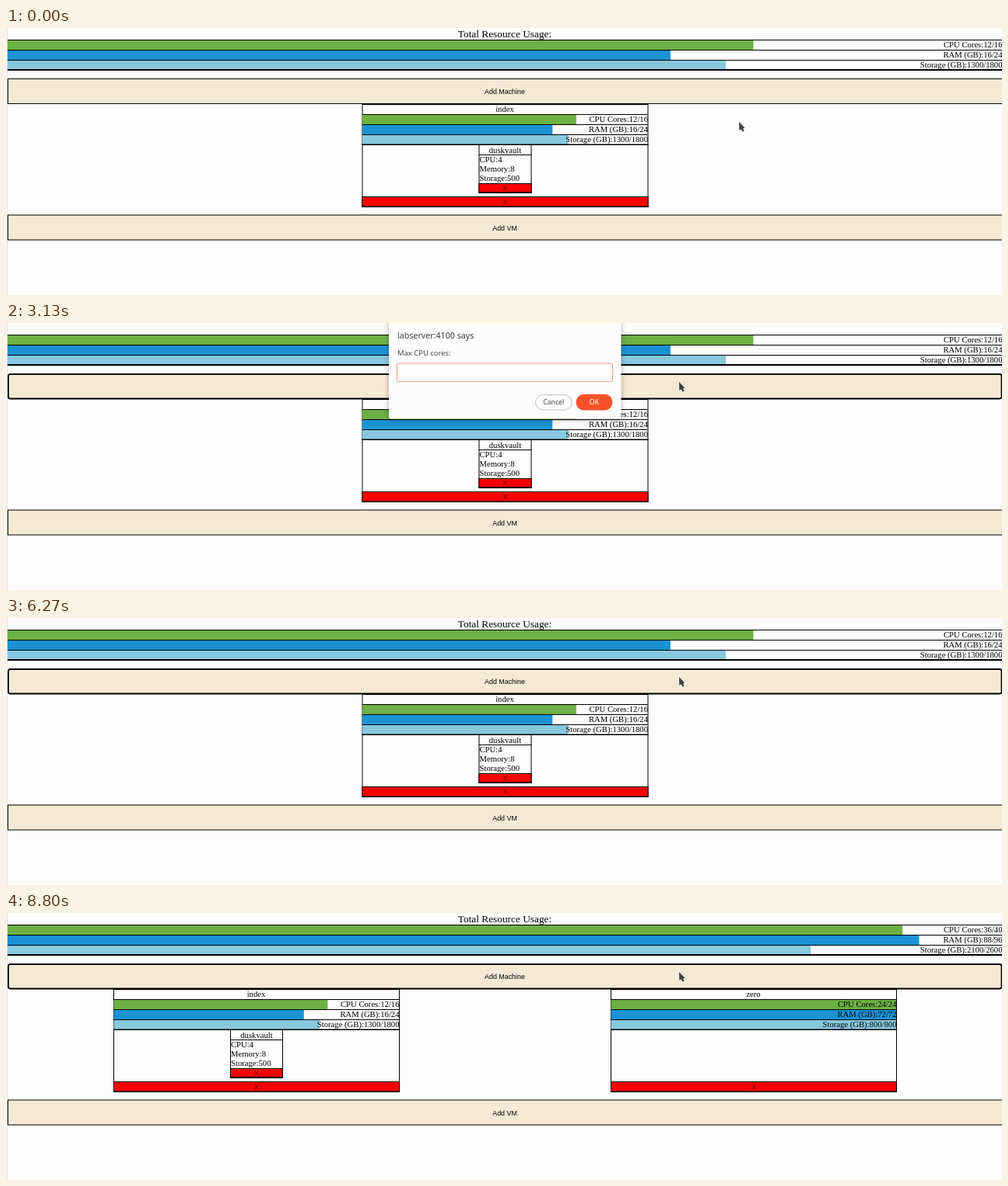
An HTML page with a canvas for the animation above (9470 ms loop, 1280 by 344 pixels).

```html
<!DOCTYPE html>
<html lang="en">
<head>
<meta charset="utf-8">
<title>Resource dashboard</title>
<style>
html, body { margin: 0; width: 100%; height: 100%; overflow: hidden; background: #fdfdfd; }
canvas { display: block; }
</style>
</head>
<body>
<canvas id="stage" width="1280" height="344"></canvas>
<script>
const ctx = document.getElementById('stage').getContext('2d');
const LOOP = 9470;
const PAGE = '#fdfdfd', INK = '#000', RED = '#fb0000', BEIGE = '#f5e9d6';
const SERIF = '"Liberation Serif", serif';
const SANS = '"Liberation Sans", sans-serif';
const UI = '"Noto Sans", sans-serif';
const BAR_COLORS = ['#6db044', '#1a92d3', '#87c8df'];
const BAR_NAMES = ['CPU Cores', 'RAM (GB)', 'Storage (GB)'];

// Each dialog: open and close times, prompt, answer, time of each key
const dialogs = [
  { open: 990, close: 2350, label: 'Name of machine:', answer: 'zero', keys: [1600, 1730, 1860, 2000] },
  { open: 2600, close: 4470, label: 'Max CPU cores:', answer: '24', keys: [3670, 3730] },
  { open: 4660, close: 6130, label: 'Max RAM in GB:', answer: '72', keys: [5530, 5670] },
  { open: 6480, close: 8200, label: 'Max storage in GB:', answer: '800', keys: [7670, 7800, 7870] }
];
const FOCUS_AT = 930, ADDED_AT = 8330;

const clamp = v => Math.max(0, Math.min(1, v));
const smooth = v => v * v * (3 - 2 * v);
const mix = (a, b, k) => a + (b - a) * k;

function rect(x, y, w, h, color) {
  ctx.fillStyle = color;
  ctx.fillRect(x, y, w, h);
}

function text(str, x, y, size, family, align = 'left', color = INK) {
  ctx.font = size + 'px ' + family;
  ctx.textAlign = align;
  ctx.fillStyle = color;
  ctx.fillText(str, x, y);
}

function outline(x, y, w, h) {
  ctx.strokeStyle = INK;
  ctx.lineWidth = 1;
  ctx.strokeRect(x + 0.5, y + 0.5, w - 1, h - 1);
}

function round(x, y, w, h, r, fill, stroke, width = 1) {
  ctx.beginPath();
  ctx.roundRect(x, y, w, h, r);
  if (fill) { ctx.fillStyle = fill; ctx.fill(); }
  if (stroke) { ctx.strokeStyle = stroke; ctx.lineWidth = width; ctx.stroke(); }
}

function bars(x, y, w, step, usage) {
  usage.forEach(([free, max], i) => {
    const top = Math.round(y + i * step);
    rect(x, top + 1, w * free / max, step - 1, BAR_COLORS[i]);
    rect(x, top, w, 1, INK);
    text(`${BAR_NAMES[i]}:${free}/${max}`, x + w + 0.5, top + 10.3, 10.67, SERIF, 'right');
  });
}

function wideButton(label, y, focused) {
  if (focused) {
    round(3, y + 1, 1276.5, 31.5, 2.5, BEIGE, INK, 1.8);
  } else {
    rect(2, y, 1278, 33, BEIGE);
    outline(2, y, 1280, 33);
  }
  text(label, 641, y + 20, 8.89, SANS, 'center');
}

function deleteBar(x, y, w, h) {
  rect(x, y, w, h, RED);
  outline(x, y, w, h);
  rect(x, y + h - 1.5, w, 1.5, INK);
  text('X', x + w / 2, y + h / 2 + 3, 8.89, SANS, 'center', '#500');
}

function vm(x) {
  outline(x, 150, 68, 63);
  text('duskvault', x + 34, 160.5, 10.67, SERIF, 'center');
  rect(x, 163, 68, 1, INK);
  ['CPU:4', 'Memory:8', 'Storage:500'].forEach((line, i) =>
    text(line, x + 1, 173.3 + i * 12, 10.67, SERIF));
  deleteBar(x, 200, 68, 12.5);
}

function machine(x, name, usage, hasVm) {
  outline(x, 98, 368, 133);
  text(name, x + 183.5, 108, 10.67, SERIF, 'center');
  bars(x + 0.5, 111, 366.5, 13, usage);
  rect(x, 149.5, 368, 1.5, INK);
  if (hasVm) vm(x + 150);
  deleteBar(x, 217, 368, 14);
}

function page(focused, added) {
  rect(0, 0, 1280, 344, PAGE);
  rect(1, 0, 1, 344, '#dedede');
  text('Total Resource Usage:', 641, 12, 13.33, SERIF, 'center');
  bars(2, 15, 1278, 13, added
    ? [[36, 40], [88, 96], [2100, 2600]]
    : [[12, 16], [16, 24], [1300, 1800]]);
  rect(2, 53, 1278, 2, INK);
  wideButton('Add Machine', 65, focused);
  machine(added ? 138 : 457.5, 'index', [[12, 16], [16, 24], [1300, 1800]], true);
  if (added) machine(777, 'zero', [[24, 24], [72, 72], [800, 800]], false);
  wideButton('Add VM', 240.5, false);
}

function dialog(d, t) {
  const shown = smooth(clamp((t - d.open) / 180)) * (1 - smooth(clamp((t - d.close) / 120)));
  if (shown <= 0) return;
  ctx.save();
  ctx.globalAlpha = shown;
  ctx.translate(0, -14 * (1 - shown));

  ctx.save();
  ctx.shadowColor = 'rgba(0,0,0,0.32)';
  ctx.shadowBlur = 7;
  ctx.shadowOffsetY = 1;
  round(492, -20, 298.5, 143.5, 3, '#fcfcfc');
  ctx.restore();

  text('labserver:4100 says', 503, 20.2, 10.67, UI, 'left', '#3c3c3c');
  text(d.label, 503, 42, 9.45, UI, 'left', '#4a4a4a');

  round(502.5, 52, 277, 23.5, 2, '#fdfdfd', '#ee9c85');
  const typed = d.answer.slice(0, d.keys.filter(k => k <= t).length);
  text(typed, 508, 66.7, 8.5, UI, 'left', '#303030');
  const caretX = 508 + ctx.measureText(typed).width;
  const last = Math.max(d.open, ...d.keys.filter(k => k <= t));
  if (Math.floor((t - last) / 500) % 2 === 0) rect(Math.round(caretX), 57, 1, 12.5, '#222');

  round(680.5, 92.5, 46.5, 19.5, 9.75, '#fcfcfc', '#bdbdc6');
  text('Cancel', 703.7, 105.3, 8.67, UI, 'center', '#454545');
  round(732.5, 91.8, 47, 20.6, 10.3, '#f9522a');
  text('OK', 755.8, 105.3, 8.67, UI, 'center', '#fff');
  ctx.restore();
}

function pointer(t) {
  const k = smooth(clamp((t - 100) / 680));
  ctx.save();
  ctx.translate(mix(942, 865, k), mix(121, 76, k));
  ctx.beginPath();
  [[0, 0], [0.3, 10.8], [2.6, 9.4], [4.6, 12.8], [6.7, 11.6], [5.1, 8.6], [7.4, 7.4]]
    .forEach(([x, y]) => ctx.lineTo(x, y));
  ctx.closePath();
  ctx.lineJoin = 'round';
  ctx.strokeStyle = 'rgba(250,250,250,0.8)';
  ctx.lineWidth = 1.2;
  ctx.stroke();
  ctx.fillStyle = '#414141';
  ctx.fill();
  ctx.restore();
}

const start = performance.now();
function draw() {
  const t = Math.max(0, performance.now() - start) % LOOP;
  page(t >= FOCUS_AT, t >= ADDED_AT);
  dialogs.forEach(d => dialog(d, t));
  pointer(t);
  requestAnimationFrame(draw);
}
draw();
</script>
</body>
</html>
```
